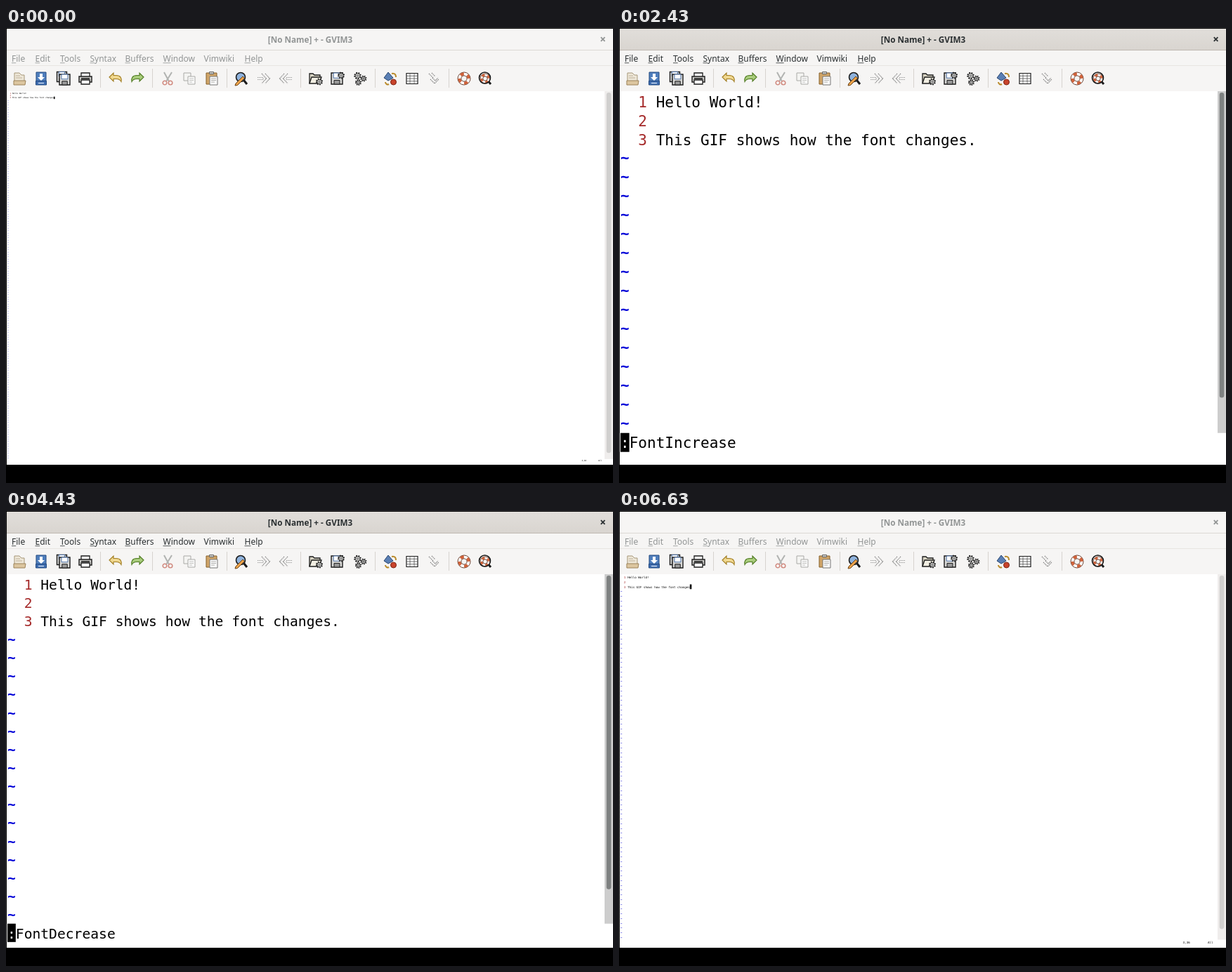
An HTML page with a canvas for the animation above (7.03 s loop, 864 by 648 pixels).

```html
<!DOCTYPE html>
<html lang="en">
<head>
<meta charset="utf-8">
<title>Editor font size</title>
<style>
html, body { margin: 0; width: 100%; height: 100%; overflow: hidden; background: #000; }
canvas { display: block; }
</style>
</head>
<body>
<canvas id="stage" width="864" height="648"></canvas>
<script>
const g = document.getElementById('stage').getContext('2d');
const LOOP = 7030, SCALE_X = 0.8445, SCALE_Y = 0.8433, TICK = 1000 / 15;
const UI = '"Noto Sans", "Open Sans", sans-serif';
const MONO = '"DejaVu Sans Mono", "Noto Sans Mono", monospace';
const LEFT = 2, TOP = 91;
const LINES = ['Hello World!', '', 'This GIF shows how the font changes.'];
const MENU = [['File', 8], ['Edit', 41.5], ['Tools', 77], ['Syntax', 119.5], ['Buffers', 169.5],
  ['Window', 223.5], ['Vimwiki', 281.5], ['Help', 339.5]];

const ACTIVE = { bar: ['#e1deda', '#d9d5d0'], edge: '#bfb8b1', ink: '#2b3032', trough: '#cdcdcd', thumb: '#7e8181' };
const IDLE = { bar: ['#f6f5f4', '#f6f5f4'], edge: '#dcd8d4', ink: '#929595', trough: '#efedec', thumb: '#d0cfce' };

// ---------- timeline ----------
// [start, size, command line shown, end and final size when the key is held]
const KEYS = [
  [0, 2], [1100, 3, 1], [1170, 3], [1570, 4, 1, 2430, 19], [2570, 19], [2700, 20],
  [3100, 21, 1], [3170, 22, 1], [3230, 23, 1], [3300, 23], [3700, 24, 1], [3770, 25],
  [4230, 24, 1, 4830, 7], [4830, 7], [5230, 6, 1], [5300, 6], [5570, 5, 1], [5630, 4, 1], [5700, 4]
];

function stateAt(t) {
  const [start, from, cmd, end, to] = KEYS.findLast(k => k[0] <= t);
  let size = from;
  if (end) {
    const steps = Math.round((end - start) / TICK);
    const step = Math.min(steps, Math.floor((t - start + 10) / TICK));
    size = Math.round(from + (to - from) * step / steps);
  }
  const command = cmd ? (t < 4000 ? ':FontIncrease' : ':FontDecrease') : '';
  const fading = Math.max(0, Math.floor((6629 - t) / 66) / 4);
  const focus = t < 230 ? 0 : Math.min(1, fading);
  return { size, command, focus };
}

// ---------- helpers ----------
function rect(x, y, w, h, color) {
  g.fillStyle = color;
  g.fillRect(x, y, w, h);
}

function shape(d, fill, stroke, width = 1, dash = []) {
  const p = new Path2D(d);
  if (fill) { g.fillStyle = fill; g.fill(p); }
  if (stroke) {
    g.strokeStyle = stroke;
    g.lineWidth = width;
    g.setLineDash(dash);
    g.stroke(p);
    g.setLineDash([]);
  }
}

const circle = (x, y, r) => `M${x - r} ${y}a${r} ${r} 0 1 0 ${2 * r} 0a${r} ${r} 0 1 0 ${-2 * r} 0z`;
const box = (x, y, w, h) => `M${x} ${y}h${w}v${h}h${-w}z`;

// ---------- toolbar icons, each centred on 0,0 ----------
const INK = '#1c1c1c';

function gear(x, y, r) {
  shape(circle(x, y, r), '', INK, 2, [r * 0.42, r * 0.365]);
  shape(circle(x, y, r - 0.9), '#f0f0ee', INK, 0.9);
  shape(circle(x, y, r * 0.3), '#fff', INK, 0.8);
}

function floppy(x, y, s) {
  shape(box(x, y, s, s), '#d8d8d6', INK, 1.4);
  shape(box(x + s * 0.2, y, s * 0.6, s * 0.45), '#fff', '#4a6fa5', 1);
  shape(box(x + s * 0.25, y + s * 0.65, s * 0.5, s * 0.35), '#999', INK, 1);
}

function folder() {
  shape('M-9 7v-14h5l2 2h8v4', '#d8d4c4', INK, 1.3);
  shape('M-9 7l3-9h14l-3 9z', '#f1eee2', INK, 1.3);
}

function lens(x, y, r, fill) {
  shape(`M${x + r * 0.7} ${y + r * 0.7}L8 8`, '', INK, 3);
  shape(circle(x, y, r), fill, INK, 1.6);
}

function buoy(r) {
  shape(circle(0, 0, r), '#fff', '#6b4434', 1);
  shape(circle(0, 0, r * 0.73), '', '#d0623a', r * 0.46, [r * 0.573, r * 0.573]);
  shape(circle(0, 0, r * 0.46), '#f6f5f4', '#6b4434', 1);
}

function curl(fill, stroke, flip) {
  g.scale(flip, 1);
  shape('M-9-2l6-6v3.5h4c6 0 8 4 7 9c-1.5-3-4-4-7-4h-4v3.5z', fill, stroke, 1.1);
}

function chevrons(flip) {
  g.scale(flip, 1);
  shape('M-3-7l6.5 7l-6.5 7M2-7l6.5 7l-6.5 7', '', '#777', 1.2, [1.2, 0.9]);
  shape('M-9-1.5h8v3h-8', '', '#8a8a8a', 0.9, [1.2, 1]);
}

const ICONS = [
  [19, () => {
    shape('M-7-8h7l3 3h4v9h-14z', '#eee7d8', '#a59678');
    shape('M-5-4h6M-5-1h9', '', '#bdb099');
    shape('M-8 3h17l-1 6h-16z', '#dcc6a0', '#9c8258');
  }],
  [50, () => {
    shape(box(-7, -9, 14, 13), '#4f7ebd', '#254a80');
    shape('M-2-7h4v5h3l-5 5l-5-5h3z', '#fff');
    shape(box(-7.5, 3.5, 15, 5.5), '#3e6db0', '#254a80');
    shape('M-4 6.5h8', '', '#dfe8f4', 1.2);
  }],
  [82, () => { floppy(-9.5, -9.5, 14); floppy(-6, -6, 15); }],
  [113, () => {
    shape(box(-6, -8, 12, 6), '#fff', INK, 1.3);
    shape('M-9-3h18v8h-18z', '#c9c9c6', INK, 1.4);
    shape(box(-6, 2, 12, 6), '#fff', INK, 1.3);
    shape('M-6 0h12', '', INK, 1.6);
  }],
  [156, () => curl('#f0d890', '#a17d22', 1)],
  [187, () => curl('#a9cc7c', '#4f7a22', -1)],
  [230, () => {
    shape('M-5-9l7 13M6-9l-8 13', '', '#b1b3b1', 2);
    shape(circle(-4, 6, 2.8) + circle(4, 6, 2.8), '', '#d18b80', 1.6);
  }],
  [261, () => {
    shape(box(-8, -8, 10, 11), '#f4f4f2', '#a9a9a6');
    shape(box(-2, -3, 10, 11), '#fafafa', '#a9a9a6');
    shape('M0 0h6M0 2.5h6M0 5h4', '', '#c4c4c1');
  }],
  [293, () => {
    shape(box(-8, -8, 15, 16), '#cfa468', '#86602a');
    shape(box(-3.5, -9.5, 6, 3), '#c8c8c4', '#666');
    shape('M-3-3h11v12h-11z', '#fafafa', '#777');
    shape('M-1 0h7M-1 2.5h7M-1 5h5', '', '#b0b0ae');
  }],
  [335, () => {
    lens(-1, -2, 6.5, '#8fb2dc');
    shape('M-8 7l10-10l2.5 2.5l-10 10l-3.5 .5z', '#eaa14a', '#6a4418', 1);
  }],
  [367, () => chevrons(1)],
  [398, () => chevrons(-1)],
  [441, () => { folder(); gear(5, 4.5, 4); }],
  [472, () => { floppy(-9, -8, 16); gear(5, -4.5, 4); }],
  [504, () => { gear(-3.5, -4, 4.2); gear(5, 0, 3.5); gear(-2.5, 5.5, 3.5); }],
  [547, () => {
    shape('M-3-9l7 8l-7 4l-6-4z', '#5a7fb4', '#28456f');
    shape(circle(4.5, 5, 4), '#c9442c', '#7c2415');
    shape('M2-7c5-1 6 2 6 5M-7 5c0 3 3 4 5 3', '', '#b98b2b', 2);
  }],
  [578, () => {
    shape(box(-8, -7.5, 16, 15), '#fff', INK, 1.2);
    shape('M-8-3.7h16M-8 0h16M-8 3.7h16M-3 -7.5v15M3-7.5v15', '', '#555', 0.8);
  }],
  [609, () => {
    shape('M-7-7l6 6M-3-8l5 5', '', '#888', 1.4, [1.3, 1]);
    shape('M-5 1l6 6l6-6M-2-1l4 4l4-4', '', '#777', 1.2, [1.3, 0.9]);
  }],
  [652, () => buoy(9)],
  [682, () => { buoy(7); lens(-0.5, -1, 8, ''); }]
];

// ---------- window ----------
function chrome(p, rowEnd, visible) {
  const fade = g.createLinearGradient(0, 1, 0, 31);
  p.bar.forEach((c, i) => fade.addColorStop(i, c));
  rect(1, 1, 863, 30, fade);
  rect(1, 31, 863, 1, p.edge);
  rect(1, 32, 863, 58, '#f6f5f4');
  rect(1, 53, 863, 1, '#e8e5e2');

  g.fillStyle = p.ink;
  g.textAlign = 'center';
  g.font = `bold 11.7px ${UI}`;
  g.fillText('[No Name] + - GVIM3', 433, 21);
  shape('M846.8 13.2l5.6 5.6M852.4 13.2l-5.6 5.6', '', p.ink, 1.8);

  g.textAlign = 'left';
  g.font = `12px ${UI}`;
  for (const [label, x] of MENU) {
    g.fillStyle = p.ink;
    g.fillText(label, x, 48);
    if (label !== 'Vimwiki') rect(x, 49.4, g.measureText(label[0]).width, 0.8, p.ink);
  }

  rect(852, 90, 12, rowEnd - 90, p.trough);
  g.fillStyle = p.thumb;
  g.beginPath();
  g.roundRect(854.7, 92, 6.6, (rowEnd - 94) * visible / (visible + 2), 3.3);
  g.fill();
}

function toolbar() {
  for (const x of [134, 208, 314, 419, 525, 630]) rect(x, 58, 1, 27, '#d7d3cf');
  for (const [x, paint] of ICONS) {
    g.save();
    g.translate(x, 72);
    paint();
    g.restore();
  }
}

function draw({ size, command, focus }) {
  const cw = Math.round(size * 0.8) * SCALE_X;
  const lh = Math.round(size * 1.66 + 0.9) * SCALE_Y;
  const rows = Math.floor(529.5 / lh), cols = Math.floor(848.5 / cw);
  const last = rows - 1, rowEnd = TOP + last * lh;

  const put = (text, col, row, color, weight = '') => {
    g.font = `${weight} ${cw / 0.602}px ${MONO}`;
    g.fillStyle = color;
    [...text].forEach((ch, i) => g.fillText(ch, LEFT + (col + i) * cw, TOP + (row + 0.8) * lh));
  };
  const cursor = (ch, col, row) => {
    rect(LEFT + col * cw, TOP + row * lh, cw, lh, '#000');
    put(ch, col, row, '#fff');
  };

  rect(0, 0, 864, 648, '#000');
  rect(1, 90, 863, 532, '#fff');
  if (focus < 1) chrome(IDLE, rowEnd, last);
  if (focus > 0) {
    g.globalAlpha = focus;
    chrome(ACTIVE, rowEnd, last);
    g.globalAlpha = 1;
  }
  toolbar();

  LINES.forEach((line, row) => {
    put(String(row + 1), 2, row, '#a52a2a');
    put(line, 4, row, '#000');
  });
  for (let row = LINES.length; row < last; row++) put('~', 0, row - 0.05, '#0000d8', 'bold');

  if (command) {
    put(command, 0, last, '#000');
    cursor(command[0], 0, last);
  } else {
    cursor('.', 39, 2);
    put('3,36', cols - 18, last, '#000');
    put('All', cols - 4, last, '#000');
  }
}

let shown = '';
function tick() {
  const state = stateAt(performance.now() % LOOP);
  const key = JSON.stringify(state);
  if (key !== shown) {
    shown = key;
    draw(state);
  }
  requestAnimationFrame(tick);
}
tick();
</script>
</body>
</html>
```
